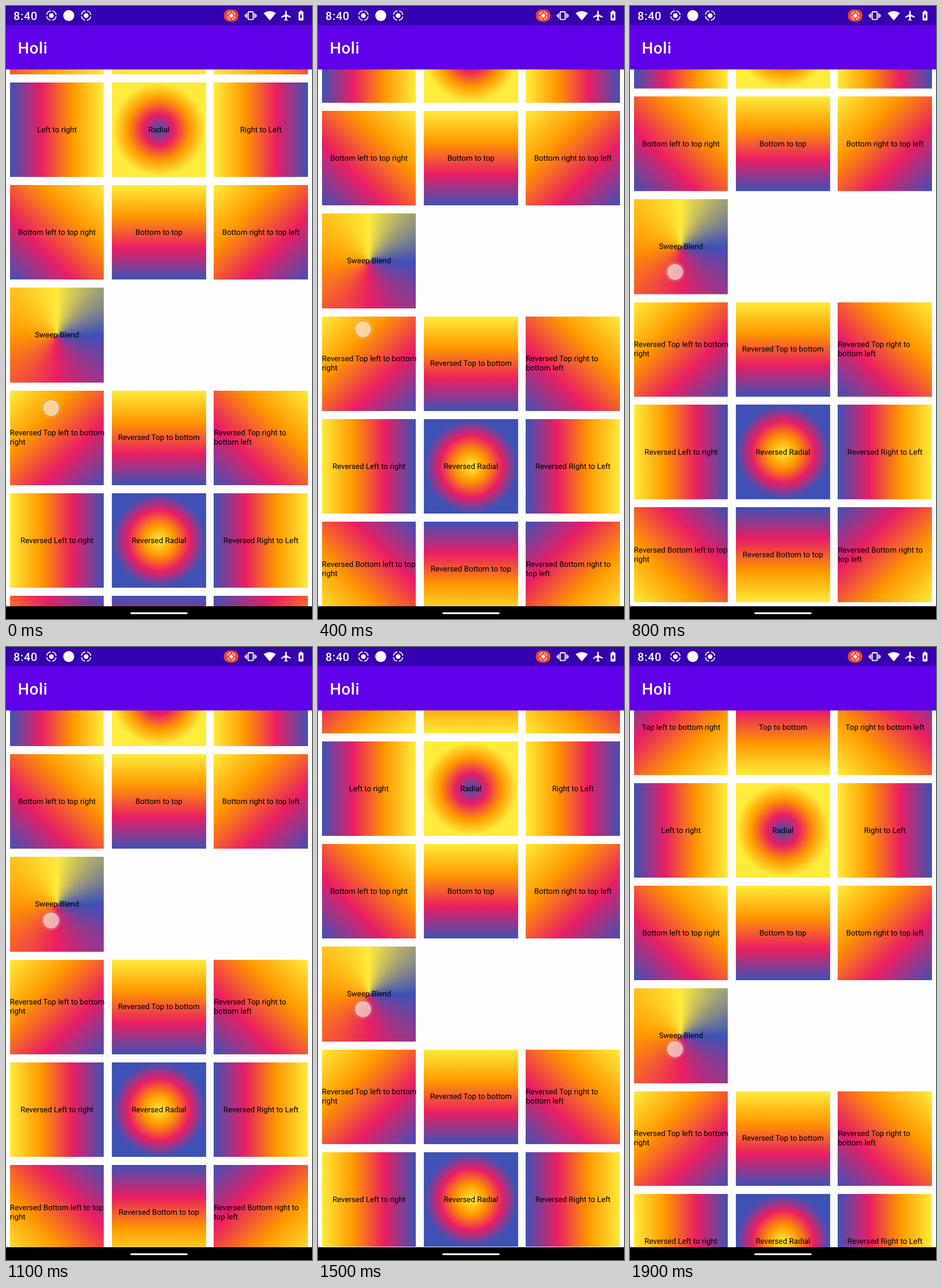
An HTML page for the animation above (2 s loop, 529x1058 px).

```html
<!DOCTYPE html>
<html lang="en">
<head>
<meta charset="utf-8">
<title>Gradient grid</title>
<style>
  html, body { margin: 0; height: 100%; overflow: hidden; background: #fdfdfd; }
  #stage { position: relative; width: 529px; height: 1058px; overflow: hidden; font-family: Roboto, sans-serif; }
  #list, #bars { position: absolute; left: 0; top: 0; }
  #list { will-change: transform; }
  .tile {
    position: absolute; width: 162.7px; height: 163.4px;
    display: flex; align-items: center; justify-content: center;
    font-size: 13.3px; line-height: 16px; white-space: pre; color: #000;
    text-rendering: geometricPrecision;
  }
  .tile span { position: relative; top: 1.1px; }
  .tile .wrapped { width: 100%; }
  #touch {
    position: absolute; left: 63.4px; top: -15px; width: 28px; height: 28px;
    border: 1px solid rgba(150, 110, 105, .5); border-radius: 50%;
    background: rgba(246, 238, 230, .68); background-clip: padding-box;
    box-shadow: 0 0 2px 2px rgba(255, 255, 255, .18);
  }
</style>
</head>
<body>
<div id="stage">
  <div id="list"></div>
  <div id="touch"></div>
  <svg id="bars" width="529" height="1058" fill="#fff" text-rendering="geometricPrecision">
    <defs>
      <g id="record">
        <circle r="4"/>
        <circle r="8.2" fill="none" stroke="#fff" stroke-width="1.6" stroke-dasharray="10 2.88" stroke-dashoffset="-1.44"/>
      </g>
    </defs>
    <rect width="529" height="33.5" fill="#3500ae"/>
    <rect y="33" width="529" height="76.5" fill="#5f00e8"/>
    <rect y="1036" width="529" height="22" fill="#000"/>
    <rect x="215" y="1046.5" width="99" height="3" rx="1.5"/>
    <text x="13" y="24" font-size="19.6" font-weight="500" letter-spacing=".8">8:40</text>
    <text x="20.4" y="81.7" font-size="27.4" font-weight="500" letter-spacing=".7">Holi</text>
    <use href="#record" x="78.5" y="16.5"/>
    <circle cx="108.5" cy="16.5" r="9.5"/>
    <use href="#record" x="138.5" y="16.5"/>
    <rect x="376.5" y="6" width="25.5" height="21" rx="10" fill="#ea4335"/>
    <use href="#record" transform="translate(389.3 16.5) scale(.8)"/>
    <g fill="none" stroke="#fff" stroke-width="1.8">
      <rect x="418.7" y="10" width="8.6" height="13.4" rx="1"/>
      <path d="M416 12.5v8.5M430 12.5v8.5M413.6 14.5v4.5M432.4 14.5v4.5"/>
    </g>
    <path d="M456 25 445.3 12.3Q456 5 466.7 12.3Z"/>
    <path transform="translate(474 6.3) scale(.87)" d="M21 16v-2l-8-5V3.5c0-.83-.67-1.5-1.5-1.5S10 2.67 10 3.5V9l-8 5v2l8-2.5V19l-2 1.5V22l3.5-1 3.5 1v-1.5L13 19v-5.5l8 2.5z"/>
    <path transform="translate(499.8 6.3) scale(.85)" d="M15.67 4H14V2h-4v2H8.33C7.6 4 7 4.6 7 5.33v15.33C7 21.4 7.6 22 8.33 22h7.33c.74 0 1.34-.6 1.34-1.33V5.33C17 4.6 16.4 4 15.67 4zM11 20v-5.5H9L13 7v5.5h2L11 20z"/>
  </svg>
</div>
<script>
const LOOP = 2000, STEP = 100, PITCH = 177.3, LIST_END = -152.6;
const list = document.getElementById('list');
const touch = document.getElementById('touch');
const colors = ['#3f51b5', '#e91e63', '#ff9800', '#ffeb3b'];
const reversed = [...colors].reverse();

const linear = angle => stops => `linear-gradient(${angle}deg, ${stops})`;
const radial = stops => `radial-gradient(circle 80px, ${stops})`;
const sweep = stops => `conic-gradient(from 90deg, ${stops}, ${stops[0]})`;

function addTile(row, col, label, gradient, stops) {
  const tile = document.createElement('div');
  const text = document.createElement('span');
  tile.className = 'tile';
  tile.style.left = 6.73 + col * 176.33 + 'px';
  tile.style.top = 131.8 + row * PITCH + 'px';
  tile.style.background = gradient(stops);
  text.textContent = label;
  if (label.includes('\n')) text.className = 'wrapped';
  tile.append(text);
  list.append(tile);
}

const directions = [
  ['Top left to bottom right', linear(135)], ['Top to bottom', linear(180)], ['Top right to bottom left', linear(225)],
  ['Left to right', linear(90)], ['Radial', radial], ['Right to Left', linear(270)],
  ['Bottom left to top right', linear(45)], ['Bottom to top', linear(0)], ['Bottom right to top left', linear(315)]
];
const wrap = label => label
  .replace(/(left to (?:bottom|top)) right/, '$1\nright')
  .replace(/(right to) (bottom|top)/, '$1\n$2');

directions.forEach(([label, gradient], i) => {
  const row = Math.floor(i / 3), col = i % 3;
  addTile(row - 1, col, label, gradient, colors);
  addTile(row + 3, col, wrap('Reversed ' + label), gradient, reversed);
});
addTile(2, 0, 'Sweep Blend', sweep, colors);

// Keys are [time, value]
const scrollKeys = [[0, 0], [200, -50], [400, -128], [500, -165], [950, -152.6], [1100, -124], [1300, -44.3], [1500, 31], [1700, 79], [1900, 103]];
const touchKeys = [[0, 694], [200, 639], [400, 558], [600, 496], [800, 459], [950, 446], [1100, 472], [1300, 553], [1500, 625], [1700, 671], [1900, 694]];

// Smooth cubic curve through the keys
function sample(keys, t) {
  const last = keys.length - 1;
  const slope = i => {
    const a = keys[Math.max(i - 1, 0)], b = keys[Math.min(i + 1, last)];
    return (b[1] - a[1]) / (b[0] - a[0]);
  };
  let i = 0;
  while (i < last - 1 && t >= keys[i + 1][0]) i++;
  const [t0, v0] = keys[i], [t1, v1] = keys[i + 1];
  const d = t1 - t0, u = (t - t0) / d, w = 1 - u;
  return w * w * ((1 + 2 * u) * v0 + u * d * slope(i)) + u * u * ((1 + 2 * w) * v1 - w * d * slope(i + 1));
}

function draw(now) {
  const t = Math.floor(now % LOOP / STEP) * STEP;
  const scroll = Math.max(LIST_END, sample(scrollKeys, t));
  list.style.transform = `translateY(${scroll}px)`;
  touch.style.transform = `translateY(${sample(touchKeys, t)}px)`;
}

const start = performance.now();
function tick() {
  draw(performance.now() - start);
  requestAnimationFrame(tick);
}
tick();
</script>
</body>
</html>
```
